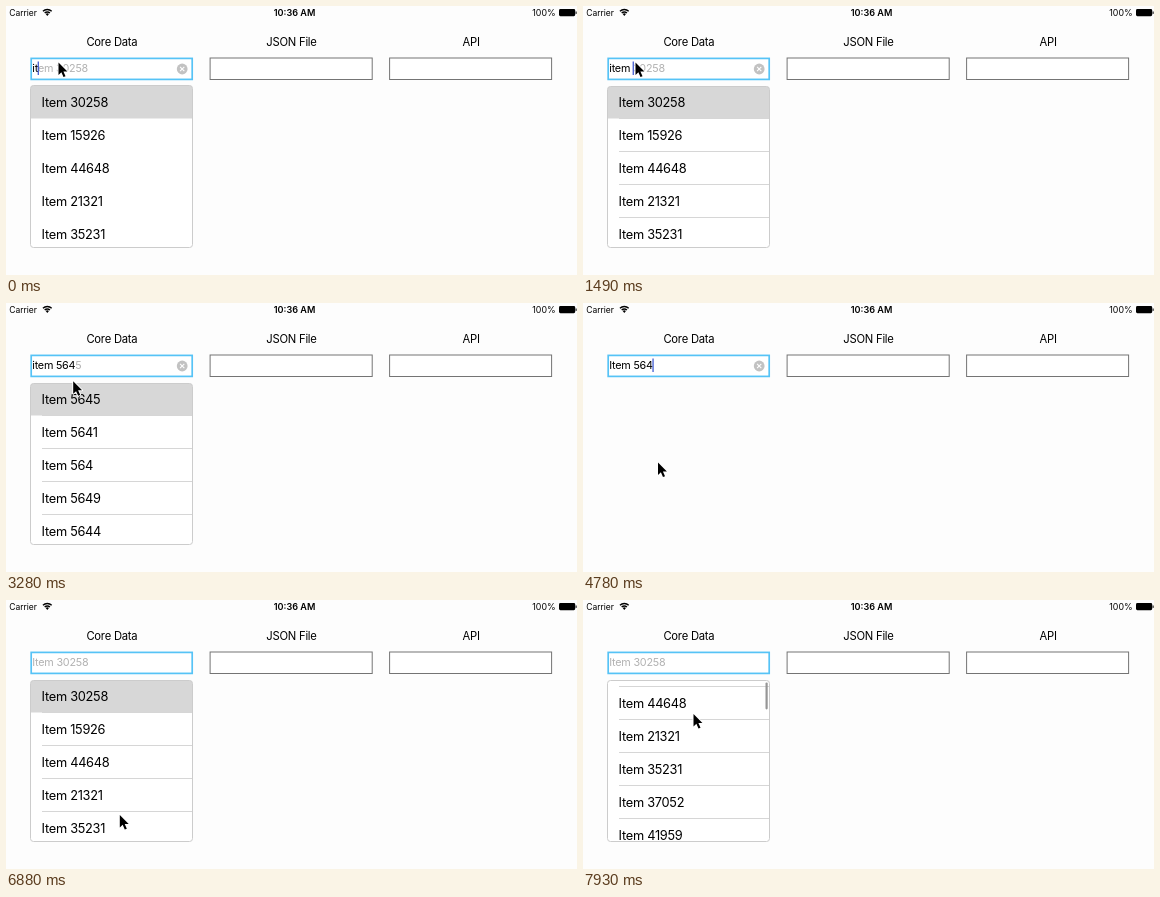
Write an HTML page with a canvas that moves like this. It is 571 px wide and 269 px high and loops after 8000 ms.

```html
<!DOCTYPE html>
<html lang="en">
<head>
<meta charset="utf-8">
<title>Autocomplete field</title>
<style>
  html, body { margin: 0; width: 100%; height: 100%; overflow: hidden; background: #fdfdfd; }
  canvas { display: block; width: 571px; height: 269px; }
</style>
</head>
<body>
<canvas id="stage"></canvas>
<script>
const WIDTH = 571, HEIGHT = 269, LOOP = 8000;
const canvas = document.getElementById("stage");
const ctx = canvas.getContext("2d");
const ratio = window.devicePixelRatio || 1;
canvas.width = WIDTH * ratio;
canvas.height = HEIGHT * ratio;

const QUERY = "item 564";
const WORD = { start: 0, first: 2, last: 5, pace: 300 };
const DIGITS = { start: 1940, first: 6, last: 8, pace: 350 };
const SELECT = 4780, PRESS = 5980, CLEAR = 6280, REOPEN = 6430, SCROLL = 6880;
const SETTLE = 290, GRAB_Y = 173;
const LIST = { x: 24.5, y: 80, width: 162, bottom: 241.5, row: 33 };

const KNOWN = {
  "": "30258 15926 44648 21321 35231 37052 41959 28413".split(" "),
  "564": "5645 5641 564 5649 5644".split(" "),
};

// Pointer stops: [time, x, y]
const STOPS = [
  [0, 52.5, 56.5], [2980, 52.5, 56.5], [3280, 67.2, 78.3], [3730, 89, 174],
  [4180, 75, 159.5], [SELECT, 75, 159.5], [5380, 222, 77], [5830, 172.5, 60.5],
  [CLEAR, 172.5, 60.5], [SCROLL, 113.8, 215], [7930, 110.5, 114], [LOOP, 110.5, 114],
];

// The picture advances in 150 ms steps, re-phased twice.
function stepTime(t) {
  const base = t < 1490 ? 0 : t < 2980 ? 1490 : 2980;
  return base + Math.floor((t - base) / 150) * 150;
}

function pointerAt(t) {
  const next = STOPS.findIndex(stop => stop[0] > t);
  const [t0, x0, y0] = STOPS[next - 1], [t1, x1, y1] = STOPS[next];
  const k = (t - t0) / (t1 - t0);
  return { x: x0 + (x1 - x0) * k, y: y0 + (y1 - y0) * k };
}

function suggestionsFor(digits) {
  const random = i => Math.abs(Math.sin(i * 12.9898 + digits.length) * 43758.5453) % 1;
  return KNOWN[digits] ||
    Array.from({ length: 5 }, (_, i) => digits + Math.floor(random(i + 1) * 10 ** (5 - digits.length)));
}

function fieldAt(t) {
  if (t >= CLEAR) return { typed: "", changed: REOPEN, list: t >= REOPEN ? KNOWN[""] : null };
  if (t >= SELECT) return { typed: "Item 564", changed: SELECT, list: null };
  const burst = t < DIGITS.start ? WORD : DIGITS;
  const length = Math.min(burst.last, burst.first + Math.floor((t - burst.start) / burst.pace));
  return {
    typed: QUERY.slice(0, length),
    changed: burst.start + (length - burst.first) * burst.pace,
    list: suggestionsFor(QUERY.slice(5, length)),
  };
}

// Solid right after a keystroke, blinking otherwise.
function caretVisible(t, { typed, changed }) {
  const phase = t % 1050;
  return typed && (t - changed < 300 || (phase >= 280 && phase < 890));
}

function text(string, x, y, size, { color = "#000", align = "left", weight = 400, tracking = -0.022 } = {}) {
  ctx.font = `${weight} ${size}px Inter, "Liberation Sans", sans-serif`;
  ctx.letterSpacing = `${size * tracking}px`;
  ctx.textAlign = align;
  ctx.fillStyle = color;
  ctx.fillText(string, x, y);
  return ctx.measureText(string).width;
}

function rect(x, y, w, h, color) {
  ctx.fillStyle = color;
  ctx.fillRect(x, y, w, h);
}

function inputBox(x, y, w, h, color, line) {
  rect(x, y, w, h, "#fff");
  ctx.strokeStyle = color;
  ctx.lineWidth = line;
  ctx.strokeRect(x, y, w, h);
}

function fillRound(x, y, w, h, r, color) {
  ctx.beginPath();
  ctx.roundRect(x, y, w, h, r);
  ctx.fillStyle = color;
  ctx.fill();
}

function drawStatusBar() {
  text("Carrier", 3.2, 9.8, 8.5, { tracking: 0 });
  text("10:36 AM", 288.5, 9.9, 9.1, { align: "center", weight: 600, tracking: 0 });
  text("100%", 549.6, 9.8, 8.8, { align: "right", tracking: 0 });

  const wifiArc = radius => ctx.arc(41.3, 9.7, radius, -Math.PI * 0.75, -Math.PI * 0.25);
  ctx.strokeStyle = ctx.fillStyle = "#000";
  ctx.lineWidth = 1.3;
  for (const radius of [3.7, 6.2]) {
    ctx.beginPath();
    wifiArc(radius);
    ctx.stroke();
  }
  ctx.beginPath();
  ctx.moveTo(41.3, 9.9);
  wifiArc(2.3);
  ctx.fill();

  fillRound(553, 3, 16.2, 7.2, 1.4, "#000");
  rect(569.6, 5.5, 1, 2.4, "#000");
}

function drawForm() {
  ["Core Data", "JSON File", "API"].forEach((title, i) =>
    text(title, 105.9 + i * 179.6, 40.3, 11.25, { align: "center" }));
  inputBox(25.2, 52.4, 161, 21, "#56c3f6", 1.7);
  inputBox(204.1, 52, 162.1, 21.5, "#747474", 1);
  inputBox(383.6, 52, 162, 21.5, "#747474", 1);
}

function drawClearButton(pressed) {
  ctx.save();
  ctx.translate(176.2, 63);
  ctx.beginPath();
  ctx.arc(0, 0, 5.4, 0, Math.PI * 2);
  ctx.fillStyle = pressed ? "#0b72d6" : "#c2c2c2";
  ctx.fill();
  ctx.rotate(Math.PI / 4);
  rect(-3, -0.55, 6, 1.1, "#fff");
  rect(-0.55, -3, 1.1, 6, "#fff");
  ctx.restore();
}

function drawField(field, t) {
  const { typed, list } = field;
  const width = text(typed, 26.3, 66.2, 10.8);
  if (list) {
    text(`Item ${list[0]}`.slice(typed.length), 26.3 + width, 66.2, 10.8, { color: "#b2b2b2" });
  }
  if (caretVisible(t, field)) rect(26 + width, 55.5, 1.2, 13.5, "#3450cf");
  if (typed) drawClearButton(t >= PRESS);
}

function drawList(list, settled, scroll) {
  const top = LIST.y + (settled ? 0.5 : -0.5);
  const frame = [LIST.x, top, LIST.width, LIST.bottom - top, 3];
  ctx.save();
  fillRound(...frame, "#fff");
  ctx.clip();
  list.forEach((number, i) => {
    const y = LIST.y + i * LIST.row - scroll;
    if (i === 0) rect(LIST.x, y - 1, LIST.width, LIST.row + 0.5, "#d7d7d7");
    text(`Item ${number}`, 35.6, y + 21, 12.8);
    if (settled) rect(36, y + LIST.row - 1, LIST.width, 1, "#d6d6d6");
  });
  if (scroll > 0) fillRound(182.5, 81.5 + scroll * 0.015, 2.2, 27, 1.1, "#969696");
  ctx.restore();
  ctx.beginPath();
  ctx.roundRect(...frame);
  ctx.strokeStyle = "#cccccc";
  ctx.lineWidth = 1;
  ctx.stroke();
}

const arrow = new Path2D("M0 0V16L3.7 12.6L6.4 18.6L9 17.5L6.3 11.6H11.4Z");

function drawPointer({ x, y }) {
  ctx.save();
  ctx.translate(x, y);
  ctx.scale(0.78, 0.78);
  ctx.strokeStyle = "#fff";
  ctx.lineWidth = 2.4;
  ctx.lineJoin = "round";
  ctx.stroke(arrow);
  ctx.fillStyle = "#000";
  ctx.fill(arrow);
  ctx.restore();
}

function draw(now) {
  const t = stepTime(now % LOOP);
  const field = fieldAt(t);
  const pointer = pointerAt(t);

  ctx.setTransform(ratio, 0, 0, ratio, 0, 0);
  rect(0, 0, WIDTH, HEIGHT, "#fdfdfd");
  drawStatusBar();
  drawForm();
  drawField(field, t);
  if (field.list) {
    const scroll = t > SCROLL ? Math.max(0, GRAB_Y - pointer.y) : 0;
    drawList(field.list, t - field.changed >= SETTLE, scroll);
  }
  drawPointer(pointer);
}

const begin = performance.now();
function tick() {
  draw(performance.now() - begin);
  requestAnimationFrame(tick);
}
tick();
</script>
</body>
</html>
```
